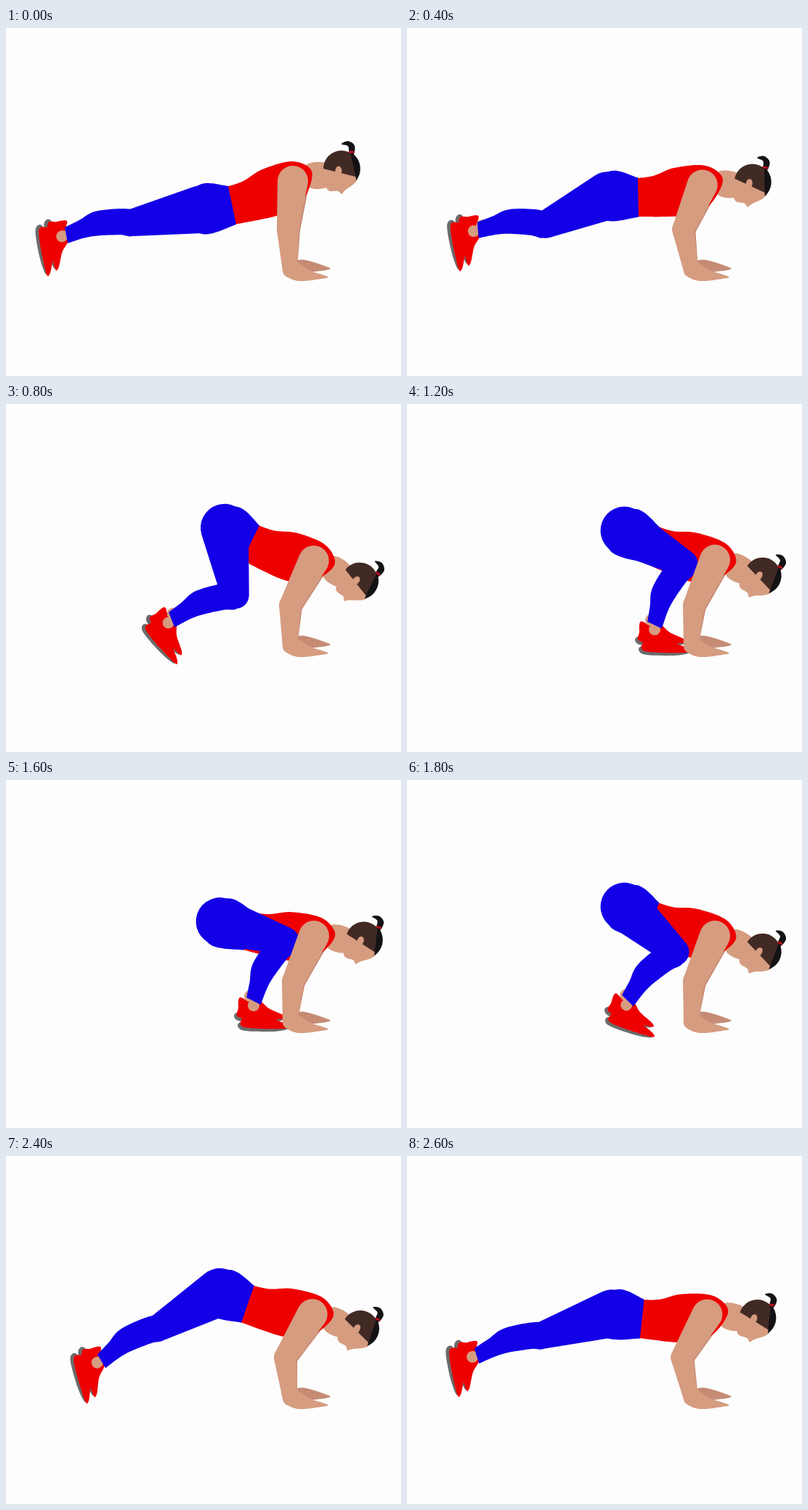
Write an HTML page with a canvas that moves like this. It is 544 px wide and 480 px high and loops after 2.8 s.

```html
<!DOCTYPE html>
<html lang="en">
<head>
<meta charset="utf-8">
<title>Plank jump-in</title>
<style>
  html, body { margin: 0; width: 100%; height: 100%; overflow: hidden; background: #fdfdfd; }
  canvas { display: block; }
</style>
</head>
<body>
<canvas id="stage" width="544" height="480"></canvas>
<script>
const ctx = document.getElementById('stage').getContext('2d');
const LOOP = 2800, STEP = 200, LIMB = 94;
const RED = '#ee0000', BLUE = '#1400e6', SKIN = '#d69c80', SHADE = '#c68b74',
      BROWN = '#412a23', BLACK = '#141215', GREY = '#6b6b6b';

const { PI, sin, cos, hypot, atan2, acos } = Math;
const clamp = x => Math.min(1, Math.max(0, x));
const smooth = x => x * x * (3 - 2 * x);
const rad = deg => deg * PI / 180;

function fill(color) {
  ctx.fillStyle = color;
  ctx.fill();
}

// Smooth curve through flat x,y points; an open one is closed by a straight edge.
function shape(color, xy, open = false) {
  const n = xy.length / 2;
  const at = i => {
    const k = open ? Math.max(0, Math.min(n - 1, i)) : (i + n) % n;
    return [xy[2 * k], xy[2 * k + 1]];
  };
  ctx.beginPath();
  ctx.moveTo(...at(0));
  for (let i = 0; i < (open ? n - 1 : n); i++) {
    const [a, b, c, d] = [at(i - 1), at(i), at(i + 1), at(i + 2)];
    ctx.bezierCurveTo(b[0] + (c[0] - a[0]) / 6, b[1] + (c[1] - a[1]) / 6,
                      c[0] - (d[0] - b[0]) / 6, c[1] - (d[1] - b[1]) / 6, c[0], c[1]);
  }
  ctx.closePath();
  fill(color);
}

function oval(color, x, y, rx, ry) {
  ctx.beginPath();
  ctx.ellipse(x, y, rx, ry, 0, 0, 2 * PI);
  fill(color);
}

// Part of a disc cut off by a straight chord.
function segment(color, r, from, to) {
  ctx.beginPath();
  ctx.arc(0, -2, r, rad(from), rad(to));
  fill(color);
}

// Two joints of different radius joined by their outer tangents.
function taper(color, x1, y1, r1, x2, y2, r2) {
  const dx = x2 - x1, dy = y2 - y1;
  const dir = atan2(dy, dx), off = acos((r1 - r2) / hypot(dx, dy));
  ctx.beginPath();
  ctx.arc(x1, y1, r1, dir + off, dir - off + 2 * PI);
  ctx.arc(x2, y2, r2, dir - off, dir + off);
  fill(color);
}

function within(x, y, angle, draw) {
  ctx.save();
  ctx.translate(x, y);
  ctx.rotate(angle);
  draw();
  ctx.restore();
}

function shoe() {
  shape(GREY, [-18, 29, -16, 40, 25, 42, 47, 38, 20, 33]);
  shape(RED, [-14, 8, 0, 14, 12, 11, 26, 23, 47, 33, 43, 38, -13, 36, -16, 22]);
  oval(SKIN, 0, 6, 8, 8);
}

function arm(color, sx, sy, ex) {
  taper(color, sx, sy, 21, ex, 278, 15);
  taper(color, ex, 278, 15, 391, 334, 10);
}

function head() {
  shape(SKIN, [17, -21, 45, -25, 52, -6, 46, 9, 22, 8]);
  ctx.translate(67, -15);
  shape(SKIN, [-22, -5, -24, 14, -18, 28, -5, 29, 0, 33, 5, 28, 22, 12, 12, -12]);
  segment(BROWN, 25, 180, 388);
  segment(BLACK, 26, -62, 38);
  oval(SKIN, -4, 1, 4.5, 6.5);
  shape(BLACK, [0, -36, 9, -40, 18, -34, 17, -22, 11, -24, 9, -33]);
  oval('#c4101c', 14, -25, 4, 1.5);
}

function torso() {
  shape(RED, [-91, 8, -68, 0, -42, -16, -3, -27, 22, -19, 26, -2, 12, 29, -19, 47, -80, 60], true);
}

function pelvis() {
  shape(BLUE, [-89, 7, -128, 5, -157, 39, -125, 73, -78, 60], true);
}

function shin(len) {
  shape(BLUE, [len, -11, .65 * len, -8, .25 * len, -13, .05 * len, -18, -4, 0, 0, 18,
               .5 * len, 25, .78 * len, 17, len, 11], true);
}

function drawPose(t) {
  // feet: 0 = plank, 1 = tucked; rise: hips up; sink: squat in the middle
  const feet = smooth(clamp((t - 200) / 1000) ** 1.2) - smooth(clamp((t - 1600) / 1200) ** .8);
  const rise = 1 - clamp(Math.max((1000 - t) / 700, (t - 2000) / 800)) ** 2;
  const sink = Math.abs(t - 1500) < 500 ? cos(PI * (t - 1500) / 1000) ** 2 : 0;
  const sway = sin(PI * rise);

  const lean = rad(41 * rise - 16.5 * sink), nod = lean - rad(8 * sink);
  const sx = 395 + 29 * sin(PI / 2 * rise), sy = 211 + 4 * rise + 6 * sway;
  const ex = 388 + 7 * rise - 13 * sway;
  const hx = sx - 125 * cos(lean) - 39 * sin(lean);
  const hy = sy - 125 * sin(lean) + 39 * cos(lean);
  const ax = 83 + 258 * feet, ay = 286 + 19 * sin(PI / 2 * feet) - 12 * sway;

  // The knee sits in front of the middle of the line from hip to ankle.
  const dx = ax - hx, dy = ay - hy, reach = hypot(dx, dy);
  const bend = Math.sqrt(Math.max(0, LIMB ** 2 - reach ** 2 / 4)) / reach;
  const kx = hx + dx / 2 + dy * bend, ky = hy + dy / 2 - dx * bend;

  ctx.fillStyle = '#fdfdfd';
  ctx.fillRect(0, 0, 544, 480);

  arm(SHADE, sx + 2, sy, ex + 2);
  shape(SHADE, [394, 332, 398, 322, 412, 320, 441, 329, 445, 333, 420, 336]);
  within(ax, ay, rad(78 * (1 - feet ** 1.6)), () => {
    within(-5, -13, 0, shoe);
    shoe();
  });
  within(sx, sy, nod, head);
  within(sx, sy, lean, torso);
  within(sx, sy, lean, pelvis);
  taper(BLUE, hx, hy, 33, kx, ky, 19);
  within(kx, ky, atan2(ay - ky, ax - kx), () => shin(hypot(ax - kx, ay - ky)));
  arm(SKIN, sx, sy, ex);
  shape(SKIN, [386, 342, 404, 349, 434, 346, 443, 343, 420, 335, 397, 322, 386, 328]);
}

function tick() {
  drawPose(Math.floor(performance.now() % LOOP / STEP) * STEP);
  requestAnimationFrame(tick);
}
tick();
</script>
</body>
</html>
```
